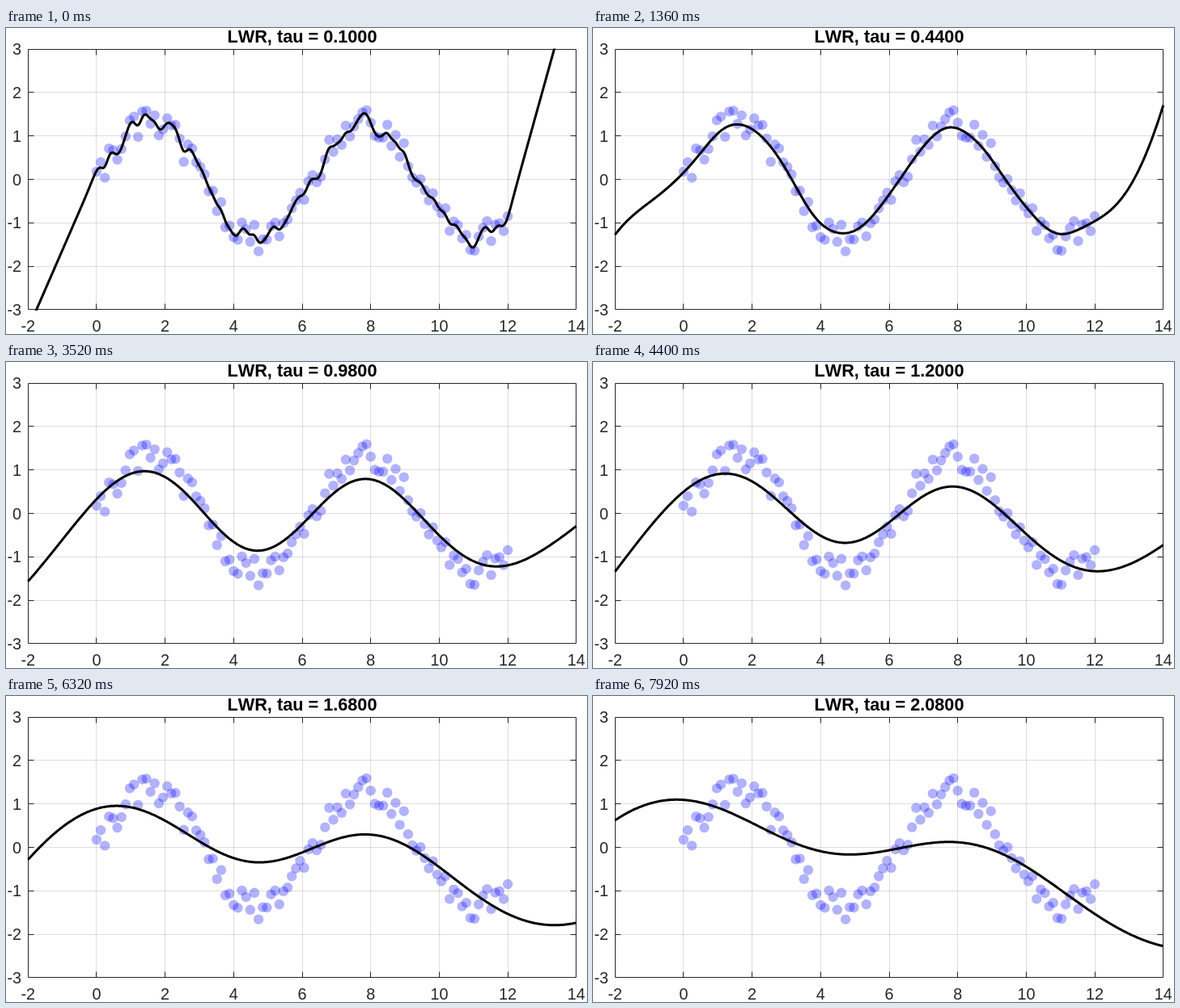
Write an HTML page that moves like this. It is 718x379 px and loops after 8000 ms.

```html
<!DOCTYPE html>
<html lang="en">
<head>
<meta charset="utf-8">
<title>Locally weighted regression</title>
<style>
  html, body { margin: 0; width: 100%; height: 100%; overflow: hidden; background: #fff; }
  svg { display: block; width: 718px; height: 379px; }
  text { font-family: "Liberation Sans", Arial, sans-serif; font-kerning: none; }
  #labels { font-size: 19.8px; fill: #262626; }
  #title { font-size: 21.7px; font-weight: bold; text-anchor: middle; }
</style>
</head>
<body>
<svg viewBox="0 0 718 379">
  <clipPath id="plot"><rect x="25.5" y="25.5" width="681" height="324.5"/></clipPath>
  <path id="grid" stroke="#262626" stroke-opacity=".15" fill="none"/>
  <path id="axes" stroke="#262626" fill="none"/>
  <g id="labels"></g>
  <g id="dots" fill="#00f" fill-opacity=".3"></g>
  <path id="curve" clip-path="url(#plot)" fill="none" stroke="#000" stroke-width="3" stroke-linejoin="round"/>
  <text id="title" x="366" y="18"></text>
</svg>
<script>
const $ = id => document.getElementById(id);
const STEP = 80, LOOP = 8000, SAMPLES = 640, COUNT = 100, X_MAX = 12;
const px = x => 27.2 + (x + 2) * 42.35;
const py = y => 187.45 - y * 53.8;
const crisp = v => Math.floor(v) + 0.5;
const mean = list => list.reduce((sum, v) => sum + v, 0) / list.length;

// Mersenne Twister; one partial twist is enough for up to 113 numbers
function twister(seed) {
  const state = [seed];
  for (let i = 1; i < 624; i++) {
    const prev = state[i - 1];
    state[i] = (Math.imul(1812433253, prev ^ (prev >>> 30)) + i) >>> 0;
  }
  let index = 0;
  const next = () => {
    const mix = (state[index] & 0x80000000) | (state[index + 1] & 0x7fffffff);
    let y = state[index + 397] ^ (mix >>> 1) ^ (mix & 1 ? 0x9908b0df : 0);
    index++;
    y ^= y >>> 11;
    y ^= (y << 7) & 0x9d2c5680;
    y ^= (y << 15) & 0xefc60000;
    return (y ^ (y >>> 18)) >>> 0;
  };
  return () => {
    const high = next() >>> 5, low = next() >>> 6;
    return (high * 2 ** 26 + low) / 2 ** 53;
  };
}

// Noisy sine, shifted and scaled to zero mean and unit deviation
function makeData() {
  const random = twister(5489);
  const xs = Array.from({ length: COUNT }, (_, i) => X_MAX * i / (COUNT - 1));
  const raw = xs.map(x => Math.sin(x) + 0.5 * random());
  const mid = mean(raw);
  const deviation = Math.sqrt(mean(raw.map(v => (v - mid) ** 2)) * COUNT / (COUNT - 1));
  return xs.map((x, i) => ({ x, y: (raw[i] - mid) / deviation }));
}
const data = makeData();

function add(parent, tag, attrs, text = "") {
  const el = document.createElementNS("http://www.w3.org/2000/svg", tag);
  for (const key in attrs) el.setAttribute(key, attrs[key]);
  el.textContent = text;
  parent.appendChild(el);
}

function drawAxes() {
  const left = crisp(px(-2)), right = crisp(px(14));
  const top = crisp(py(3)), bottom = crisp(py(-3));
  let grid = "", axes = `M${left} ${top}H${right}V${bottom}H${left}Z`;
  for (let v = -2; v <= 14; v += 2) {
    const x = crisp(px(v));
    if (v > -2 && v < 14) {
      grid += `M${x} ${top}V${bottom}`;
      axes += `M${x} ${top}v7M${x} ${bottom}v-7`;
    }
    add($("labels"), "text", { x: px(v), y: 376, "text-anchor": "middle" }, v);
  }
  for (let v = -3; v <= 3; v++) {
    const y = crisp(py(v));
    if (Math.abs(v) < 3) {
      grid += `M${left} ${y}H${right}`;
      axes += `M${left} ${y}h7M${right} ${y}h-7`;
    }
    add($("labels"), "text", { x: 19, y: py(v) + 7.2, "text-anchor": "end" }, v);
  }
  $("grid").setAttribute("d", grid);
  $("axes").setAttribute("d", axes);
}

// Weighted straight-line fit around q, evaluated at q
function fit(q, tau) {
  const near = Math.max(0, -q, q - X_MAX);
  let sw = 0, mx = 0, my = 0, sxx = 0, sxy = 0;
  const weights = data.map(p => Math.exp((near ** 2 - (p.x - q) ** 2) / (2 * tau * tau)));
  data.forEach((p, i) => {
    sw += weights[i];
    mx += weights[i] * p.x;
    my += weights[i] * p.y;
  });
  mx /= sw;
  my /= sw;
  data.forEach((p, i) => {
    sxx += weights[i] * (p.x - mx) ** 2;
    sxy += weights[i] * (p.x - mx) * (p.y - my);
  });
  return my + sxy / sxx * (q - mx);
}

let shown = -1;
function render(time) {
  const step = Math.floor(time % LOOP / STEP);
  if (step === shown) return;
  shown = step;
  const tau = 0.1 + 0.02 * step;
  const points = [];
  for (let i = 0; i <= SAMPLES; i++) {
    const x = -2 + 16 * i / SAMPLES;
    points.push(px(x).toFixed(2) + " " + py(fit(x, tau)).toFixed(2));
  }
  $("curve").setAttribute("d", "M" + points.join("L"));
  $("title").textContent = "LWR, tau = " + tau.toFixed(4);
}

drawAxes();
data.forEach(p => add($("dots"), "circle", { cx: px(p.x), cy: py(p.y), r: 6.2 }));
const start = performance.now();
function tick() {
  render(performance.now() - start);
  requestAnimationFrame(tick);
}
tick();
</script>
</body>
</html>
```
